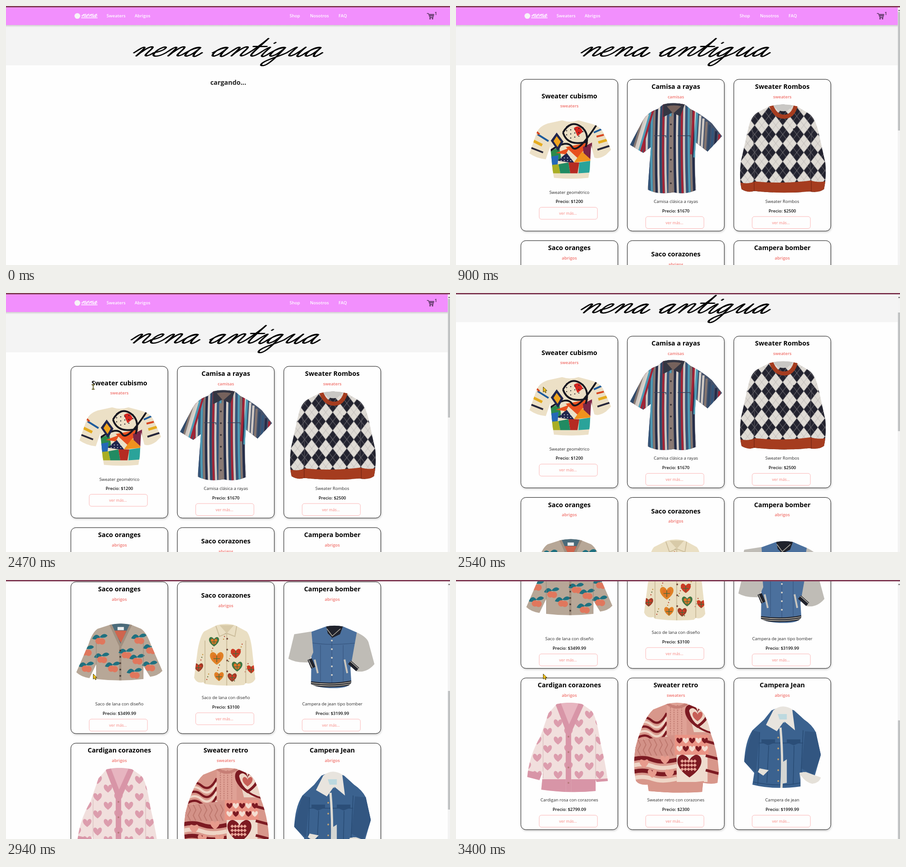
An HTML page for the animation above (3.54 s loop, 980 px wide and 572 px high).

```html
<!DOCTYPE html>
<html lang="es">
<head>
<meta charset="utf-8">
<title>Tienda</title>
<style>
html, body { margin: 0; width: 100%; height: 100%; overflow: hidden; background: #fefefe; }
svg { display: block; width: 980px; height: 572px; font: 9.5px "Open Sans", "Noto Sans", sans-serif; }
.mid { text-anchor: middle; }
.h { font-size: 14.4px; font-weight: 700; }
.b { font-weight: 600; }
.cat { font-size: 9.3px; font-weight: 600; fill: #f0706a; }
.more { font-size: 8.5px; font-weight: 600; fill: #f9a09c; }
.card { fill: #fefefe; stroke: #111; filter: drop-shadow(1px 2px 2px #0003); }
.pen { fill: none; stroke-linecap: round; stroke-linejoin: round; }
.line { fill: none; }
</style>
</head>
<body>
<svg id="stage" viewBox="0 0 980 572"></svg>
<script>
const LOOP = 3540;
const PRODUCTS = [
  ['Sweater cubismo', 'sweaters', 'Sweater geométrico', '1200'],
  ['Camisa a rayas', 'camisas', 'Camisa clásica a rayas', '1670'],
  ['Sweater Rombos', 'sweaters', 'Sweater Rombos', '2500'],
  ['Saco oranges', 'abrigos', 'Saco de lana con diseño', '3499.99'],
  ['Saco corazones', 'abrigos', 'Saco de lana con diseño', '3100'],
  ['Campera bomber', 'abrigos', 'Campera de jean tipo bomber', '3199.99'],
  ['Cardigan corazones', 'abrigos', 'Cardigan rosa con corazones', '2799.09'],
  ['Sweater retro', 'sweaters', 'Sweater retro con corazones', '2300'],
  ['Campera Jean', 'abrigos', 'Campera de jean', '1999.99']
];

// Script lettering: every letter starts and ends on the joining height
const PEN = {
  n: 'c4-8 7-15 10-14c4 1 1 12 0 22c2-10 8-23 14-23c6 0 2 12 2 18c0 6 6 8 12-3',
  e: 'c6-1 16-6 15-12c-1-6-13-1-13 12c0 11 14 12 22 0',
  a: 'c5-8 13-14 20-13c-8-3-17 4-17 14c0 12 12 11 17-12c-1 8-2 14 1 19c3 4 8-1 11-8',
  t: 'c5-9 11-24 13-36c-2 16-7 38-4 42c3 5 9 2 13-6m-24-16h26m-2 16',
  i: 'c4-8 8-14 10-14c0 6-4 18-1 22c3 4 8 0 11-8m-9-24l1-2m8 26',
  g: 'c5-8 13-14 20-13c-8-3-17 4-17 14c0 12 12 11 17-12c-1 12-1 36-8 42c-6 5-13-1-7-9c6-8 20-14 27-22',
  u: 'c4-8 8-14 10-14c0 6-5 22 2 22c6 0 12-12 15-22c-1 6-4 18-1 22c3 4 8 0 11-8',
  ' ': 'm21 0'
};
const script = word => 'M0 0' + [...word].map(c => PEN[c]).join('');

const text = (x, y, s, cls = '', fill = '#111') =>
  `<text x="${x}" y="${y}" class="${cls}" ${/cat|more/.test(cls) ? '' : `fill="${fill}"`}>${s}</text>`;
const shape = (fill, d) => `<path fill="${fill}" d="${d}"/>`;
const line = (color, w, d, dash = '') =>
  `<path class="line" stroke="${color}" stroke-width="${w}" stroke-dasharray="${dash}" d="${d}"/>`;
const dot = (x, y, r, fill) => `<circle cx="${x}" cy="${y}" r="${r}" fill="${fill}"/>`;
const heart = (x, y, s, fill) =>
  `<path transform="translate(${x} ${y}) scale(${s})" fill="${fill}" d="M0 5C-9-1-5-7-2-5Q0-4 0-2Q0-4 2-5C5-7 9-1 0 5"/>`;
const each = (list, fn) => list.map(fn).join('');
const range = (n, fn) => each([...Array(n).keys()], fn);
const buttons = (x, y, step, n, fill) => range(n, i => dot(x, y + i * step, 2, fill));

// Each garment: [fill, outline, details clipped to the outline]
const STRIPES = ['#a32436', '#cfc8c2', '#34557a', '#4d9ab4', '#857670', '#262d48', '#d9d2cb', '#324a68'];
const GARMENTS = [
  ['#ece0c6', 'M-16 91Q2 97 20 91L50 99Q68 104 75 118L92 156L81 167Q65 178 55 173L48 146L45 200L42 218Q5 222-34 218L-37 200L-42 148L-52 177Q-73 175-88 164L-72 118Q-66 104-48 98Z',
    shape('#2c8a4b', 'M-44 160L-22 150L-18 176L-44 190Z') + shape('#e8501f', 'M-8 150L42 140L20 176Z') +
    shape('#7c2545', 'M30 150L50 140V178L32 172Z') + shape('#20264e', 'M-26 180L-6 163L12 186Z') +
    shape('#f0921e', 'M10 184L28 160L50 180Z') + shape('#2468b8', 'M-44 172L-24 168L-26 190L-44 194Z') +
    shape('#a9ae24', 'M-44 190L-24 188L-20 208H-44Z') + shape('#218b62', 'M-24 188L-2 184L2 208H-20Z') +
    shape('#b52b22', 'M-2 184L22 184L18 208H2Z') + shape('#2aa39a', 'M22 184L50 180V206L20 208Z') +
    shape('#d6251f', 'M10 108Q22 98 30 116L18 126Z') + shape('#e8501f', 'M-30 163L0 152L-8 166Z') +
    range(14, i => dot(-6 + i % 5 * 9, 105 + (i * 7) % 26, 1.2, '#27222a')) +
    range(8, i => dot(-18 + i % 4 * 7, 174 + (i >> 2) * 6, 1.1, '#eee')) +
    line('#171720', 4, 'M-42 158Q-5 132 6 150T62 98M-14 118Q2 90 24 104T36 150M-14 118Q-4 150 40 138') +
    shape('#20264e', 'M-28 118L-13 138L-25 159L-41 136Z') + shape('#f0a31e', 'M-28 126L-19 138L-26 150L-35 137Z') +
    line('#1d5b9c', 4, 'M-70 122L-46 137M54 118L72 110') + line('#e5ac20', 6, 'M-82 135L-60 146M64 140L84 134') +
    line('#26263a', 4, 'M-86 151L-58 162M62 156L90 147') + line('#d8451f', 4, 'M-76 113L-66 122M60 127L76 123')],
  ['#46536c', 'M-28 56Q-8 50 20 56L32 66Q60 80 80 98L102 126L70 160L44 140Q40 190 45 245Q20 256-5 250Q-40 256-62 244Q-58 190-55 150L-72 163L-101 145L-72 90Q-60 72-40 66Z',
    range(24, i => line(STRIPES[i % 8], 4.6, `M${i * 5 - 66} 50Q${i * 5.2 - 72} 160 ${i * 5.2 - 68} 260`)) +
    range(9, i => line(STRIPES[(i * 3) % 8], 5, `M${-50 - i * 6} ${68 + i * 5}l-28 95M${40 + i * 7} ${66 + i * 7}l-6 100`)) +
    line('#8a7a74', 9, 'M-10 82L-12 252') + buttons(-11, 100, 26, 6, '#3a3438') +
    shape('#343643', 'M-28 54Q-6 48 20 55L10 82L-8 74L-28 84Z') + shape('#76625c', 'M-20 60Q-4 56 12 60L-6 76Z') +
    line('#39435a', 1.5, 'M-48 125h26v4M4 125h28v4')],
  ['#dfdbd5', 'M-28 60Q2 52 32 60L55 74Q72 82 80 118L95 185Q98 215 92 243Q80 252 60 248Q0 254-62 247Q-76 252-90 243Q-96 215-91 180L-74 105Q-68 80-52 72Z',
    '<rect x="-100" y="50" width="200" height="210" fill="url(#argyle)"/>' +
    line('#55535a', 1.2, 'M-66 110Q-58 180-64 240M66 110Q58 180 64 240') +
    shape('#a53c1f', 'M-100 226Q-80 234-60 226Q0 232 62 224Q84 230 100 224V260H-100Z') +
    line('#742512', 1.2, 'M-62 226V252M64 226V252') + shape('#c9c7c4', 'M-22 56H26Q2 86-22 56') +
    line('#a53c1f', 9, 'M-25 57Q-16 83 4 83T30 57') + shape('#22222c', 'M24 109l12-2v4l-12 2z')],
  ['#b7a797', 'M-20 95Q2 90 26 95L48 104Q60 112 70 140L95 197Q85 208 68 210L53 186V215Q0 221-51 215V182L-66 213Q-85 210-95 200L-68 138Q-60 112-48 104Z',
    shape('#4b6b7a', 'M-18 92H24L4 140Z') + shape('#cf654e', 'M-12 108H16L4 136Z') + shape('#eee', 'M-4 100h14v7h-14z') +
    line('#a19080', 5, 'M-20 94L2 142V220M26 94L3 142') +
    each([[-42, 131], [-72, 156], [-38, 172], [44, 130], [70, 152], [16, 162], [-72, 192], [-14, 192], [40, 175], [68, 190], [34, 206]],
      ([x, y]) => shape('#1f7180', `M${x - 18} ${y - 5}q8-15 17-4q9-11 17-3q-5 7-17 4q-9 7-17 3`) + dot(x - 4, y, 7, '#e0775d') + dot(x + 4, y + 1, 7, '#e0775d')) +
    line('#94877a', 1, 'M-51 135V215M53 135V215') + buttons(2, 152, 14, 5, '#473c36')],
  ['#eadfc3', 'M-20 96Q2 90 22 97L46 110Q54 118 58 150L65 215Q58 228 44 224L40 228Q0 232-46 226L-50 222Q-64 226-70 212L-62 150Q-56 118-48 110Z',
    range(34, i => dot(-62 + (i * 37) % 124, 112 + (i * 23) % 112, 1.2, ['#b6422c', '#c58c2e', '#5e6d42'][i % 3])) +
    each([[-26, 133, 2], [22, 159, 2], [-20, 170, 2.7], [-60, 190, 1.8], [25, 188, 2.1], [56, 194, 1.7], [-15, 210, 1.9], [14, 212, 1.8]],
      ([x, y, s], i) => heart(x, y, s, ['#3d7542', '#cc3b24', '#e08226', '#9f3a27'][i % 4]) +
        heart(x, y, s * .65, ['#df7426', '#cc3b24'][i % 2]) + line('#3f6b3c', 1.3, `M${x} ${y - 7}v15M${x - 7} ${y}h14`)) +
    shape('#d8caa8', 'M-14 96H18L2 114Z') + line('#cdbe9c', 2, 'M-22 98L-14 121L2 114L20 121L24 98M2 114V230M-46 130V224M44 130V224') +
    buttons(3, 126, 24, 4, '#75483a')],
  ['#4b709d', 'M-14 99Q4 95 24 99L54 112L60 150L40 190L42 222Q38 234 10 235Q-30 236-47 226L-46 160L-50 112Z',
    line('#3a5a84', 1.4, 'M-46 135Q0 142 56 135M-1 112V228M-26 140V220M24 140V220') +
    line('#20222b', 10, 'M-48 225Q0 232 44 223') + line('#c7c1b3', 1.5, 'M-48 223Q0 230 44 221M-48 227Q0 234 44 225') +
    shape('#20222b', 'M-14 96Q4 92 24 97L17 116L0 124L-10 114Z') + line('#b5b0a4', 1.5, 'M-12 104L0 120L18 104') +
    line('#c9c5bd', 4, 'M-39 172L-32 202M27 172L33 202') + buttons(-1, 130, 19, 5, '#d2d0c8'),
    shape('#bfbcb6', 'M-46 110L-84 116L-97 170Q-80 180-52 178L-42 156Z') + shape('#bfbcb6', 'M54 112Q76 122 80 134L93 182Q76 202 54 198L42 180Z') +
    line('#20222b', 10, 'M-50 171L-42 190M38 178L56 194') + line('#c7c1b3', 1.5, 'M-52 173L-44 190M40 176L58 192')],
  ['#f1dfdd', 'M-28 58Q0 52 28 58L48 72Q60 84 68 140Q80 190 85 228L60 230L58 225V250Q0 256-62 247L-58 205L-66 226L-93 219Q-88 170-64 130L-46 78Z',
    range(40, i => heart(-94 + i % 5 * 46 + (i / 5 & 1) * 23, 82 + (i / 5 | 0) * 19, 1.7, '#dc9dad')) +
    shape('#e7b5c0', 'M-24 55H24L-1 118Z') +
    line('#d895a7', 12, 'M-26 54L-2 116V256M28 54L0 116') + shape('#d895a7', 'M-96 204L-58 212L-64 230H-96ZM-64 224H-8V260H-64ZM4 224H60V260H4ZM60 224L90 222V236H60Z') +
    line('#d8bcbc', 1.2, 'M-58 125V222M58 125V222') + buttons(-2, 130, 34, 4, '#b57a7a')],
  ['#d8978b', 'M-20 58Q2 52 26 58L50 68Q68 80 76 120Q92 160 95 205L92 232Q80 236 60 232L58 252Q0 256-60 250L-62 236Q-80 238-88 228Q-96 190-88 150Q-72 90-50 70Z',
    range(7, i => line(['#7c1a22', '#efd5c6'][i % 2], 5, `M-96 ${102 + i * 10}q24-24 42-8t34-16`)) +
    shape('#dfa195', 'M-20 56H24V126H-20Z') + line('#c27d73', 2, 'M-12 60V126M-4 60V126M4 60V126M13 60V126', '3 2') +
    shape('#ecd6c7', 'M24 56H80L88 120H40Z') + heart(48, 86, 5, '#7c1a22') + heart(48, 86, 3.5, '#efd5c6') + heart(48, 86, 2, '#c75f57') +
    line('#7c1a22', 4, 'M26 64Q30 110 80 122M62 62Q76 88 84 118') +
    shape('#d39288', 'M-90 138L-4 128V172H-92Z') + range(7, i => line('#bd776d', 2, `M${-84 + i * 12} 136l6 12l-6 12l6 12`)) +
    shape('#ea9485', 'M-2 126H72V170H-2Z') +
    range(10, i => heart(8 + i % 5 * 14, 139 + (i / 5 | 0) * 18, 1.2, i % 2 ? '#f4ded2' : '#7c1a22')) +
    range(4, i => line(['#7c1a22', '#efd5c6'][i % 2], 9, `M-98 ${181 + i * 14}q24-8 46 0t54 0`)) +
    each([[-70, 190], [-24, 182], [-52, 212], [-14, 212]], ([x, y]) => heart(x, y, 1.8, '#e79b8d')) +
    shape('#efdccf', 'M2 170H70V230H2Z') + heart(30, 196, 4.8, '#7c1a22') +
    range(15, i => shape('#e8a396', `M${14 + i % 5 * 7} ${180 + (i / 5 | 0) * 9}l4 4l-4 4l-4-4z`)) +
    line('#7c1a22', 6, 'M66 140l30 8M66 172l30 8M66 204l30 8') + shape('#d8978b', 'M-62 230Q0 236 62 228V260H-62Z') +
    line('#c77f76', 6, 'M-20 56Q2 74 26 56')],
  ['#3b628f', 'M-24 72Q0 60 26 72L48 92Q66 104 74 120L85 170L70 222Q50 222 40 214L40 240Q-20 248-66 236L-62 210L-84 185Q-82 140-66 116L-40 92Z',
    shape('#325681', 'M-66 116L-50 120L-58 208L-86 186ZM50 118L76 120L86 172L68 214L42 200Z') +
    line('#274a73', 1.5, 'M-50 120L-54 236M46 116L40 240M-52 144H46M-30 150L-34 232M26 150L24 236M-64 230Q-10 242 40 232') +
    shape('#2b4e78', 'M-46 136H-16V143L-31 149L-46 143ZM10 136H40V143L25 149L10 143Z') +
    line('#dedbd3', 5, 'M-4 110Q2 180-2 244') + shape('#d4d6d3', 'M-2 188L10 180V232L-2 234Z') + buttons(-9, 132, 24, 5, '#b99f75') +
    shape('#e8e4dd', 'M38 210L48 208L74 222L64 236L40 226Z'),
    shape('#cbdde1', 'M-16 70Q0 62 18 70L4 100Z') + shape('#e8e4de', 'M-20 72Q0 56 22 70L28 116L4 96L-12 118L-36 104Z') + shape('#bdd9df', 'M-10 80H10V92H-6Z') +
    shape('#e5e1d9', 'M-50 200L-30 204L-42 216L-54 208ZM38 210L52 208L85 220Q82 232 66 234Q48 230 38 210Z')]
];

const garment = ([fill, d, inner, over = ''], i) =>
  `<clipPath id="cut${i}"><path d="${d}"/></clipPath>${shape(fill, d)}<g clip-path="url(#cut${i})">${inner}</g>${over}`;

function card(i, cx, y, w, h, title, desc, art = '') {
  const [name, cat, info, price] = PRODUCTS[i];
  return `<g transform="translate(${cx} ${y})" class="mid">
    <rect class="card" x="${-w / 2}" y=".5" width="${w}" height="${h}" rx="11"/>${art}` +
    text(0, title, name, 'h', '#000') + text(0, title + 20.5, cat, 'cat') +
    text(0, desc, info, '', '#2b2b2b') + text(0, desc + 20.5, 'Precio: $' + price, 'b') +
    `<rect x="-66.5" y="${desc + 30}" width="128.5" height="26.5" rx="5" fill="none" stroke="#fbb5b5"/>` +
    text(-3, desc + 46.5, 'ver más...', 'more') + '</g>';
}

const WIDE = { 5: 145, 6: 151 };
const COMPACT_X = [240.5, 403.5, 566.5, 729.5, 235, 399.5, 567.5, 735, 485.5];
const compact = range(9, i => card(i, COMPACT_X[i], 161.5 + (i >> 2) * 150, WIDE[i] || 142, 129, 21.5, 67.5));
const SHIFT = { 0: 20.5, 4: 14 };
const full = range(9, i => {
  const s = SHIFT[i] || 0;
  return card(i, 250.2 + i % 3 * 235, 161.5 + (i / 3 | 0) * 356.2, 214, 335, 21.5 + s, 273.5 - s, garment(GARMENTS[i], i));
});

const stage = document.getElementById('stage');
stage.innerHTML = `
<defs>
  <pattern id="argyle" width="31" height="40" patternUnits="userSpaceOnUse" x="1" y="2">
    <rect width="31" height="40" fill="#23232f"/><path d="M15.5 0L31 20L15.5 40L0 20Z" fill="#dfdbd5"/>
    <path d="M0 0L31 40M31 0L0 40" stroke="#aaa6a6" stroke-width=".7"/>
  </pattern>
  <linearGradient id="shade" x2="0" y2="1"><stop stop-color="#cfcfcf"/><stop offset="1" stop-color="#f4f4f4"/></linearGradient>
</defs>
<g id="page">
  <rect y="42" width="980" height="89" fill="#f4f4f4"/>
  <rect y="42" width="980" height="5" fill="url(#shade)"/>
  <rect width="980" height="42" fill="#f28ffd"/>
  ${dot(157.5, 22, 6.3, '#f7f3f6')}
  <path class="pen" stroke="#fff" stroke-width="5.5" transform="translate(167 21.5) scale(.26 .24) skewX(-35)" d="${script('nena')}"/>
  <path d="M166 26.3h36" stroke="#fff" stroke-width="1.4"/>
  ${each([[222, 'Sweaters'], [284, 'Abrigos'], [626, 'Shop'], [671, 'Nosotros'], [734, 'FAQ']], ([x, s]) => text(x, 25, s, 'b', '#fff'))}
  <g class="pen" stroke="#54345c" stroke-width="1.3"><path d="M929.5 16.5h3l3 9h7l2-7h-11M934 21h9.5M937 18.5v7M940.5 18.5v7"/>
    <circle cx="936" cy="28" r="1"/><circle cx="941.5" cy="28" r="1"/></g>
  ${text(946, 20, '1', 'b', '#3a2340')}
  <g id="brand" class="pen" stroke="#000" stroke-width="2.5">
    ${each([0, 1.4], k => `<path transform="translate(${282 + k} ${103 + k / 3}) scale(1.135 .87) skewX(-35)" d="${script('nena antigua')}"/>`)}
  </g>
  <g id="loading">${text(490.5, 173.5, 'cargando...', 'h mid', '#222')}</g>
  <g id="compact">${compact}</g>
  <g id="full">${full}</g>
</g>
<g id="bar"><rect x="975" y="3" width="5" height="569" fill="#f3f3f3"/>
  <path d="M976 11l2-3l2 3z" fill="#555"/><rect id="thumb" x="975.5" width="4.5" fill="#c0c2c3"/></g>
<rect width="980" height="3" fill="#833f58"/>
<g id="cursor">
  <path id="arrow" d="M0 0V11.5L2.7 9L4.7 13L6.6 12L4.7 8.2H8.4Z" fill="#f3c21b" stroke="#3a3000" stroke-width=".9"/>
  <path id="beam" class="line" d="M-3-5H3M0-5V5M-3 5H3" stroke="#5c5518" stroke-width="1.8"/>
</g>`;

// The picture is refreshed only at these moments
const TICKS = [0, 780, 840, ...[...Array(7).keys()].map(k => 1780 + 80 * k),
  2330, 2400, 2470, 2540, 2610, 2680, 2870, 2940, 3270, 3400];
// Wheel turns: start, duration, distance
const TURNS = [[2470, 210, 257], [2800, 140, 257], [3140, 260, 144]];

const $ = id => document.getElementById(id);
const show = (id, on) => $(id).setAttribute('display', on ? 'inline' : 'none');
const clamp = v => Math.min(1, Math.max(0, v));
const smooth = v => v * v * (3 - 2 * v);
const move = (id, x, y) => $(id).setAttribute('transform', `translate(${x} ${y})`);

function draw(now) {
  const time = now % LOOP;
  const t = TICKS.filter(k => k <= time).pop();
  const scroll = TURNS.reduce((sum, [start, span, dist]) => sum + dist * smooth(clamp((t - start) / span)), 0);
  show('loading', t < 780);
  show('compact', t === 780);
  show('full', t >= 840);
  show('bar', t >= 780);
  move('page', 0, -scroll);
  move('brand', t < 780 ? 0 : -5.5, 0);
  $('thumb').setAttribute('y', 13 + scroll * .4514);
  $('thumb').setAttribute('height', t < 840 ? 522 : 262);

  const p = clamp((t - 1780) / 690);
  move('cursor', 120 + 72.5 * p * p, -6 + 213.5 * p);
  show('cursor', t >= 1780);
  show('beam', t === 2470);
  show('arrow', t !== 2470);
}

function frame() {
  draw(performance.now());
  requestAnimationFrame(frame);
}
frame();
</script>
</body>
</html>
```
